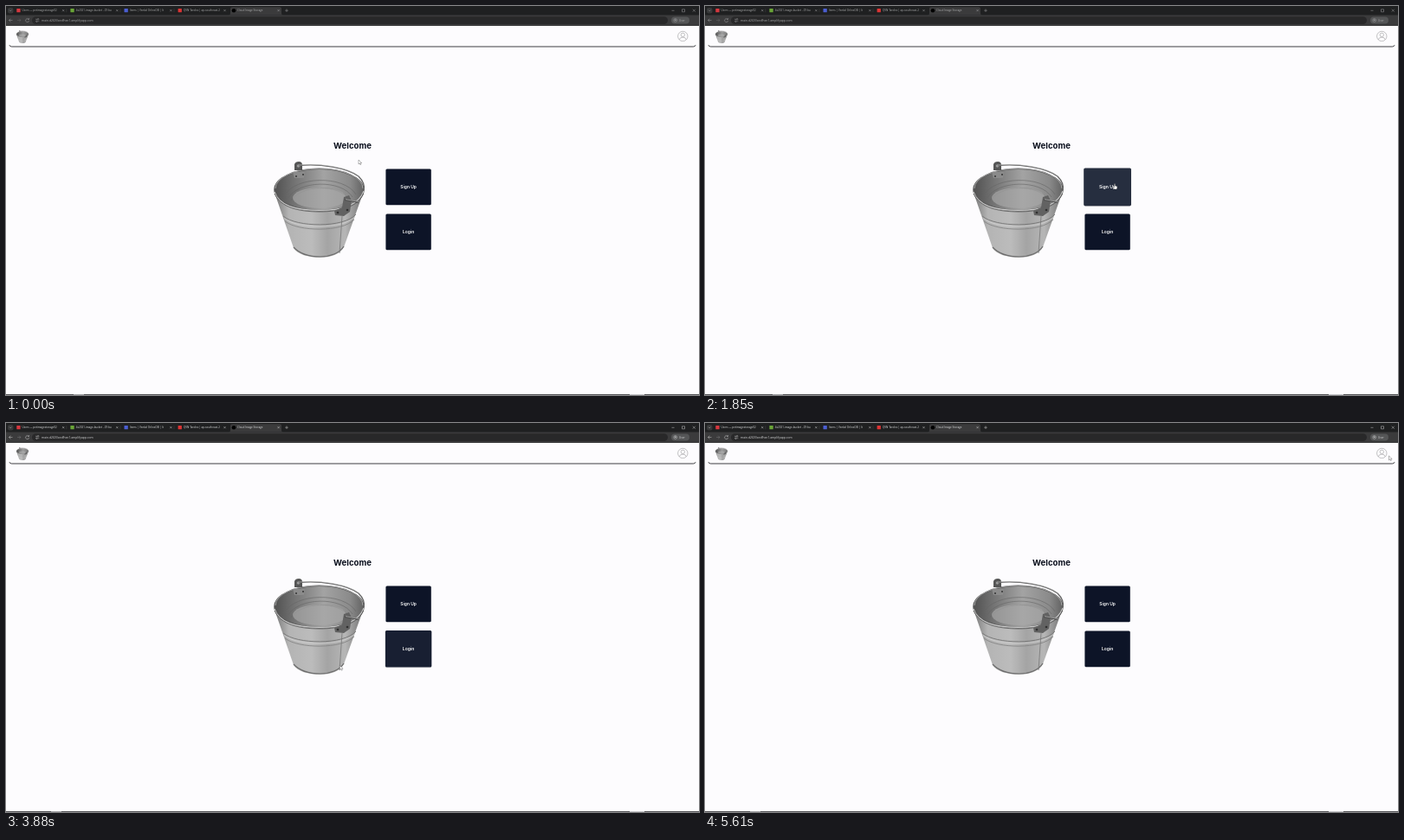
An HTML page for the animation above (5640 ms loop, 800 by 450 pixels).

```html
<!DOCTYPE html>
<html lang="en">
<head>
<meta charset="utf-8">
<title>Cloud Image Storage</title>
<style>
  html, body { margin: 0; width: 100%; height: 100%; overflow: hidden; background: #fdfcfe; }
  svg { display: block; width: 100%; height: 100%; }
  text { font-family: Inter, "Open Sans", sans-serif; }
  .chrome text { font-family: "Open Sans", "Noto Sans", sans-serif; font-size: 3.05px; fill: currentColor; }
  .chrome .url { font-size: 3.4px; }
  .icon { fill: none; stroke: currentColor; stroke-width: .45; }
  .mid { text-anchor: middle; fill: #fff; }
</style>
</head>
<body>
<svg viewBox="0 0 800 450" xmlns="http://www.w3.org/2000/svg">
  <defs>
    <linearGradient id="steel">
      <stop offset="0" stop-color="#777"/><stop offset=".16" stop-color="#b4b4b4"/>
      <stop offset=".42" stop-color="#bcbcbc"/><stop offset=".6" stop-color="#a4a4a4"/>
      <stop offset=".8" stop-color="#b6b6b6"/><stop offset="1" stop-color="#737373"/>
    </linearGradient>
    <linearGradient id="inside">
      <stop offset="0" stop-color="#515151"/><stop offset=".25" stop-color="#777"/>
      <stop offset=".55" stop-color="#a3a3a3"/><stop offset=".85" stop-color="#8a8a8a"/>
      <stop offset="1" stop-color="#626262"/>
    </linearGradient>
    <g id="bucket">
      <path d="M310 216L332 280C336 287 349 291 362 291S386 287 390 279L412 217Z" fill="url(#steel)"/>
      <path d="M332 279C340 288 352 290 363 290S385 286 390 278" fill="none" stroke="#6d6d6d" stroke-width="1.2"/>
      <g fill="none" stroke-width=".9">
        <path d="M320 243C335 256 390 257 404 241" stroke="#777"/>
        <path d="M321 245.500C336 258 389 259 403 243.500" stroke="#d0d0d0"/>
        <path d="M322 249C337 261 388 262 402 247" stroke="#858585"/>
      </g>
      <ellipse cx="361.500" cy="212.500" rx="51.500" ry="24.300" fill="url(#inside)" stroke="#555" stroke-width="1.500"/>
      <path d="M311 211A50.500 23 0 0 1 412 211" fill="none" stroke="#c5c5c5" stroke-width=".7"/>
      <g fill="none" stroke="#666" stroke-width=".6">
        <path d="M322 219C333 197 390 195 404 218"/>
        <path d="M326 222C337 202 387 200 400 221"/>
        <path d="M329 225C341 207 384 205 396 224"/>
      </g>
      <ellipse cx="362" cy="222" rx="31" ry="12" fill="#a9a9a9" opacity=".65"/>
      <path d="M310 215C315 231 337 236.500 362 236.500S407 231 413 214" fill="none" stroke="#c9c9c9" stroke-width="1.100"/>
      <path d="M310 217C317 233 338 238 362 238S407 232 412.500 217" fill="none" stroke="#555" stroke-width=".8"/>
      <path d="M333 190V183Q334 180 338 180T342 184V190Z" fill="#555"/>
      <circle cx="337.500" cy="185" r="1.800" fill="#999"/>
      <path d="M331 192L345 192 344 199 333 199Z" fill="#8b8b8b"/>
      <circle cx="335" cy="197" r="1" fill="#333"/><circle cx="343" cy="195" r="1" fill="#333"/>
      <path d="M338 184.500C362 182 394 187 407 197Q415 205 413 213" fill="none" stroke="#666" stroke-width="1.300"/>
      <path d="M338 184C362 181.500 394 186.500 407 196.500" fill="none" stroke="#bbb" stroke-width=".5"/>
      <path d="M390 221L396 219 399 225 397 238 390 243 380 242 379 237 388 233Z" fill="#626262"/>
      <circle cx="383" cy="239" r="1.300" fill="#303030"/><circle cx="394" cy="236" r="1.300" fill="#303030"/>
      <path d="M391 224L407 227" stroke="#505050" stroke-width="1.800"/>
      <path d="M392 223.600L407 226.400" stroke="#ccc" stroke-width=".6"/>
      <path d="M388 243L385 286" stroke="#777" stroke-width=".8"/>
    </g>
  </defs>

  <g class="chrome">
    <rect width="800" height="23" fill="#1f2021"/>
    <rect y="10.500" width="800" height="12.300" fill="#3b3b3c"/>
    <path d="M257 10.600Q259 10.600 259 8.500V3Q259 1.200 261 1.200H316Q318 1.200 318 3V8.500Q318 10.600 320 10.600Z" fill="#3b3b3c"/>
    <rect x="2" y="2" width="6.500" height="6.500" rx="2" fill="#38393a"/>
    <rect x="30" y="12.200" width="734" height="8.800" rx="4.400" fill="#282829"/>
    <rect x="768" y="12.500" width="21" height="8" rx="4" fill="#555657"/>
    <g id="tabs"></g>
    <path class="icon" d="M4 4.600L5.200 5.800 6.400 4.600M322.200 5.200H325.800M324 3.400V7M768.500 5.300H771.500M780.500 3.800H783.500V6.800H780.500ZM792.800 3.700L795.800 6.700M795.800 3.700L792.800 6.700"/>
    <path class="icon" d="M7.500 16.500H3.500L5.400 14.600M3.500 16.500L5.400 18.400"/>
    <path class="icon" d="M13 16.500H17L15.100 14.600M17 16.500L15.100 18.400" opacity=".4"/>
    <path class="icon" d="M26.100 15.300A2 2 0 1 0 26.600 17M26.500 14V15.600H24.900"/>
    <path class="icon" d="M34 15.300H36M34 17.700H34.700M37.200 17.700H38.300"/>
    <circle class="icon" cx="37.100" cy="15.300" r=".8"/><circle class="icon" cx="35.600" cy="17.700" r=".8"/>
    <text id="url" class="url" x="41" y="17.700"></text>
    <circle class="icon" cx="772.700" cy="16.500" r="1.900"/><circle cx="772.700" cy="16.300" r=".8" fill="currentColor"/>
    <text x="777" y="17.600">User</text>
  </g>

  <path d="M4 45.200Q4.400 47 6.500 47H793.500Q795.600 47 796 45.200" fill="none" stroke="#3d3d40" stroke-width="1"/>
  <use href="#bucket" transform="translate(-29.200 4.200) scale(.1333)"/>
  <g fill="none" stroke="#a8a8aa" stroke-width=".7">
    <circle cx="781.300" cy="35" r="5.700"/><circle cx="781.300" cy="33.400" r="2.200"/>
    <path d="M777.300 38.900Q777.800 36.200 781.300 36.200T785.300 38.900"/>
  </g>
  <rect y="449" width="800" height="1" fill="#58585b"/>
  <rect id="taskItem" y="449" width="12" height="1" fill="#a5a5a8"/>
  <rect x="720" y="449" width="17" height="1" fill="#c9c9cc"/>

  <g id="home">
    <text x="400" y="165.300" text-anchor="middle" font-size="9.600" font-weight="700" fill="#080d1b">Welcome</text>
    <use href="#bucket"/>
    <g id="signUp"></g>
    <g id="login"></g>
  </g>

  <g id="register">
    <rect x="357.500" y="161.500" width="85" height="124.800" rx="2" fill="#fdfcfe" stroke="#cfd3da" stroke-width=".8"/>
    <text x="368" y="175.700" font-size="5.300" font-weight="700" fill="#111a30">Sign Up</text>
    <g id="fields"></g>
    <rect id="cancel" x="368.200" y="267" width="25.200" height="10.500" rx="1.300"/>
    <text class="mid" x="381" y="273.600" font-size="3.800" font-weight="500">Cancel</text>
    <rect x="406.600" y="267" width="25.200" height="10.500" rx="1.300" fill="#0d1427"/>
    <text class="mid" x="419.200" y="273.600" font-size="3.800" font-weight="500">Sign Up</text>
  </g>

  <path id="arrow" d="M0 0V5L1.200 3.900 2 5.700 2.800 5.300 2 3.600H3.700Z" fill="#fff" stroke="#4c4c4c" stroke-width=".4"/>
  <path id="hand" d="M-.6.500Q0-.4.600.500V2.600L2.400 3Q3 3.300 2.900 4.200L2.400 6.500H-.5L-2.100 4.200Q-2.100 3.200-1.300 3.500L-.6 4.200Z" fill="#fff" stroke="#222" stroke-width=".35"/>
</svg>
<script>
const LOOP = 5640, FOCUS = 2000, REGISTER = 2250, RETURN = 3420, FADE = 150;
const HOVER = { signUp: [715, REGISTER], cancel: [2980, RETURN], login: [3580, 3800] };
const HOST = 'main.d2f2l3xedfhsn1.amplifyapp.com';

// Pointer stops: time, x, y
const STOPS = [
  [0, 407, 178], [40, 407, 178], [130, 392, 152], [220, 430, 119], [310, 500, 128],
  [410, 538, 175], [510, 525, 235], [600, 505, 257], [690, 495, 235], [790, 485.5, 194],
  [850, 485, 193], [1090, 478, 202], [1700, 473, 205.5], [2300, 473, 205.5],
  [2700, 430, 247], [3100, 387.3, 268.5], [3440, 387.3, 268.5], [3580, 440, 263],
  [3700, 456, 267], [3800, 438, 274], [3880, 385.5, 280.5], [4060, 379, 289],
  [4300, 373, 287], [4610, 376, 283], [4800, 378, 262], [4940, 379.5, 246.5],
  [5080, 375, 255], [5240, 376, 268], [5350, 420, 240], [5480, 620, 120],
  [5600, 789.5, 38], [LOOP, 789.5, 38]
];

const $ = id => document.getElementById(id);
const clamp = v => Math.max(0, Math.min(1, v));
const ease = v => { v = clamp(v); return v * v * (3 - 2 * v); };
const within = (t, [start, end]) => t >= start && t < end;
const show = (id, on) => $(id).setAttribute('display', on ? 'inline' : 'none');
const mix = (a, b, k) => `rgb(${a.map((v, i) => Math.round(v + (b[i] - v) * k))})`;
const buttonFill = k => mix([13, 20, 39], [38, 46, 63], k);

function slope(i, axis) {
  const rate = j => (STOPS[j + 1][axis] - STOPS[j][axis]) / (STOPS[j + 1][0] - STOPS[j][0]);
  if (i === 0 || i === STOPS.length - 1) return 0;
  const a = rate(i - 1), b = rate(i);
  return a * b > 0 ? 2 * a * b / (a + b) : 0;
}

// Monotone cubic through the pointer stops
function pointer(t, axis) {
  let i = 0;
  while (i < STOPS.length - 2 && STOPS[i + 1][0] <= t) i++;
  const [p, q] = [STOPS[i], STOPS[i + 1]], span = q[0] - p[0], u = (t - p[0]) / span, s = ease(u);
  return p[axis] * (1 - s) + q[axis] * s
    + span * u * (1 - u) * (slope(i, axis) * (1 - u) - slope(i + 1, axis) * u);
}

const hoverAmount = (t, [start, end]) => ease((t - start) / FADE) * (1 - ease((t - end) / FADE));

function build() {
  const titles = [
    ['Users — petimagestorage02', '#d8383f'], ['4x2021-image-bucket - Z9 bu', '#6aa637'],
    ['Items | Verdal OrlineDB | It', '#4b5fd3'], ['QVN Tarolex | ap-southeast-2', '#dd3434'],
    ['Cloud Image Storage', '#000']
  ];
  $('tabs').innerHTML = titles.map(([title, color], i) => {
    const x = 12.3 + i * 62.1, last = i === titles.length - 1;
    const mark = last ? `<circle cx="${x + 2.3}" cy="5.200" r="2.300" fill="${color}"/>`
                      : `<rect x="${x}" y="3" width="4.300" height="4.300" rx=".5" fill="${color}"/>`;
    const rule = i < 3 ? `<path d="M${x + 57.5} 3.200V7.300" stroke="#505152" stroke-width=".4"/>` : '';
    return `${mark}<text x="${x + 6.3}" y="6.300">${title}</text>${rule}
      <path class="icon" d="M${x + 52.8} 4.100l2.200 2.200m0-2.200l-2.200 2.200"/>`;
  }).join('');

  $('fields').innerHTML = ['Username', 'Password', 'First Name', 'Last Name', 'Email'].map((label, i) => {
    const y = 186.1 + i * 15.45;
    return `<rect x="368.400" y="${y}" width="63.200" height="10.800" rx="1.200" fill="none" stroke="#dfe3e9" stroke-width=".6"/>
      <text x="372" y="${y + 6.9}" font-size="4.150" fill="#8b929f">${label}</text>`;
  }).join('');

  [['signUp', 'Sign Up', 209.2], ['login', 'Login', 261.2]].forEach(([id, label, y]) => {
    $(id).innerHTML = `<rect class="shade" x="438.600" y="${y - 20.2}" width="52" height="42" rx="2" fill="#777"/>
      <rect class="face" x="438.400" y="${y - 20.8}" width="52.400" height="41.800" rx="1.500"/>
      <text class="mid" x="464.600" y="${y + 1.9}" font-size="4.950" font-weight="600">${label}</text>`;
    $(id).dataset.y = y;
  });
}

function drawButton(id, t) {
  const group = $(id), k = hoverAmount(t, HOVER[id]), y = group.dataset.y, size = 1 + .045 * k;
  group.setAttribute('transform', `translate(464.600 ${y}) scale(${size}) translate(-464.600 -${y})`);
  group.querySelector('.face').setAttribute('fill', buttonFill(k));
  group.querySelector('.shade').setAttribute('opacity', .35 * k);
}

function render(t) {
  const registering = within(t, [REGISTER, RETURN]), focused = t >= FOCUS;
  show('home', !registering);
  show('register', registering);
  $('url').textContent = HOST + (registering ? '/auth/register' : '');
  document.querySelector('.chrome').style.color = focused ? '#d8d9da' : '#aaabac';
  $('taskItem').setAttribute('x', focused ? 52 : 78);

  drawButton('signUp', t);
  drawButton('login', t);
  $('cancel').setAttribute('fill', buttonFill(hoverAmount(t, HOVER.cancel)));

  const pointing = Object.values(HOVER).some(span => within(t, span));
  show('hand', pointing);
  show('arrow', !pointing);
  $(pointing ? 'hand' : 'arrow').setAttribute('transform', `translate(${pointer(t, 1)} ${pointer(t, 2)})`);
}

build();
const began = performance.now();
function tick() {
  render((performance.now() - began) % LOOP);
  requestAnimationFrame(tick);
}
tick();
</script>
</body>
</html>
```
